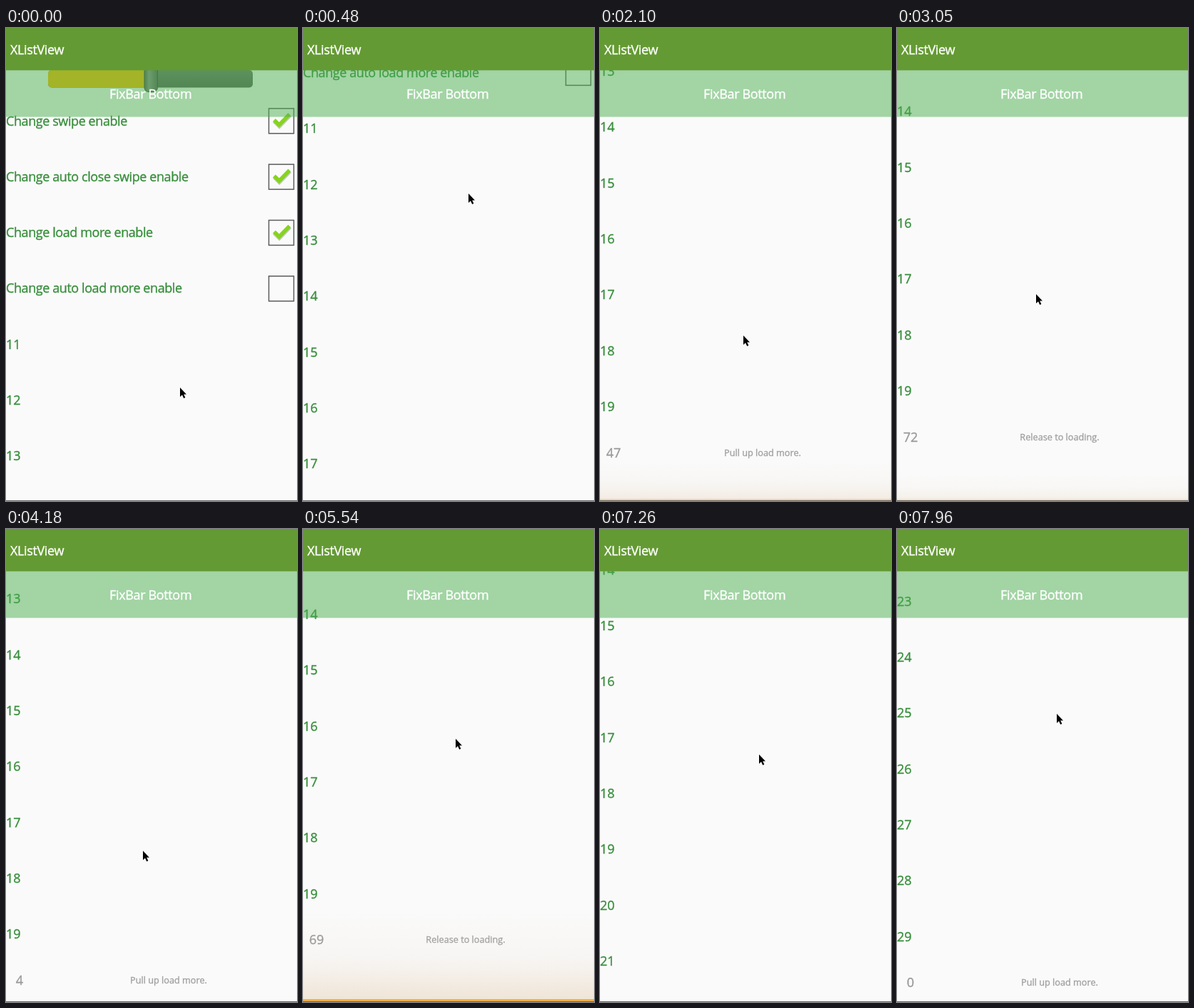
An HTML page that plays this animation: 408x663 px, repeating every 8 s.

```html
<!DOCTYPE html>
<html lang="en">
<head>
<meta charset="utf-8">
<title>XListView</title>
<style>
  html, body { margin: 0; width: 100%; height: 100%; overflow: hidden; background: #fafafa; }
  svg { display: block; width: 408px; height: 663px; }
  text { font: 18px "Open Sans", "Noto Sans", sans-serif; stroke-width: .35px; }
  .row { fill: #388e3c; stroke: #388e3c; }
  .label { letter-spacing: -.42px; }
  .bar { fill: #fff; stroke: #fff; letter-spacing: -.35px; }
  .count { fill: #999; stroke: #999; text-anchor: middle; }
  .hint { fill: #a0a0a0; stroke: #a0a0a0; font-size: 12.7px; }
</style>
</head>
<body>
<svg viewBox="0 0 408 663">
  <defs>
    <linearGradient id="haze" x1="0" y1="0" x2="0" y2="1">
      <stop offset="0" stop-color="#e6cda5" stop-opacity="0"/>
      <stop offset=".5" stop-color="#e0cdb4" stop-opacity=".1"/>
      <stop offset="1" stop-color="#dcbb91" stop-opacity=".36"/>
    </linearGradient>
    <linearGradient id="track" x1="0" y1="0" x2="0" y2="1">
      <stop offset="0" stop-color="#6e736c"/>
      <stop offset="1" stop-color="#585d56"/>
    </linearGradient>
    <linearGradient id="thumb">
      <stop offset="0" stop-color="#555"/>
      <stop offset=".35" stop-color="#8c8c8c"/>
      <stop offset="1" stop-color="#5a5a5a"/>
    </linearGradient>
  </defs>
  <rect width="408" height="663" fill="#fafafa"/>

  <g id="list">
    <rect x="59" y="59" width="287" height="24.5" rx="5" fill="url(#track)"/>
    <path d="M200 59H64a5 5 0 0 0-5 5v14.5a5 5 0 0 0 5 5h136z" fill="#fcb900"/>
    <rect x="194" y="52" width="18.5" height="37.5" rx="6" fill="url(#thumb)" stroke="#3c3c3c"/>
    <g id="footer">
      <text class="count" id="count" x="19" y="6.3"></text>
      <text class="hint" id="hint" y="4.3"></text>
      <g id="spinner" fill="none" stroke-width="2.4">
        <circle r="5.3" stroke="#ddd"/>
        <path d="M0-5.3A5.3 5.3 0 0 0 0 5.3" stroke="#666"/>
        <path d="M0 5.3A5.3 5.3 0 0 0 5.3 0" stroke="#aaa"/>
      </g>
    </g>
  </g>

  <rect id="glow" width="408" fill="url(#haze)"/>
  <rect id="edge" width="408" fill="#f2b047"/>
  <rect y="662" width="408" height="1" fill="#666"/>

  <rect y="59" width="408" height="65.6" fill="#4caf50" fill-opacity=".5"/>
  <text class="bar" x="145" y="99.3">FixBar Bottom</text>
  <rect width="408" height="59.3" fill="#649a33"/>
  <text class="bar" x="6" y="36.8">XListView</text>

  <path id="cursor" d="M0 0V13L3 10.2 5.2 15 7.4 14 5.2 9.4H9Z" stroke="#fff" paint-order="stroke"/>
</svg>
<script>
const LOOP = 8000, TICK = 59.4;
const ROW = 78.33, FIRST = 7, FIRST_Y = 130, REST = 498.7;
const FIRST_PULL = 20, RELEASE = 95, LOADED = 116;
const PULL_RATIO = .383, THRESHOLD = 45;

const linear = f => f;
const smooth = f => f * f * (3 - 2 * f);
const out = f => 1 - (1 - f) ** 2;

function ramp(tick, from, to, ease = linear) {
  return ease(Math.min(1, Math.max(0, (tick - from) / (to - from))));
}
const pulse = (tick, from, peak, hold, to) => ramp(tick, from, peak) * (1 - ramp(tick, hold, to));

const gesture = (from, to, dx, dy, ease, pulls = false) => ({ from, to, dx, dy, ease, pulls });
const gestures = [
  gesture(0, 7, -12, -279, smooth),
  gesture(7, 18, -19, 312, smooth),
  gesture(FIRST_PULL, 45, -18, -164, smooth, true),
  gesture(51, 61, -3, 55, out, true),
  gesture(67, 72, 0, 27, out, true),
  gesture(72, 74, 0, -4, linear),
  gesture(74, 93, 22, -157, linear, true),
  gesture(108, LOADED, 8, 136, smooth),
  gesture(118, 124, 2, -171, linear),
];

// Pulling up stretches the footer; pushing down gives back twice as fast.
function follow(tick) {
  const state = { x: 244, y: 504, pull: 0 };
  for (const { from, to, dx, dy, ease, pulls } of gestures) {
    const f = ramp(tick, from, to, ease);
    state.x += dx * f;
    state.y += dy * f;
    if (pulls) state.pull -= dy * f * PULL_RATIO * (dy > 0 ? 2 : 1);
  }
  state.pull *= 1 - ramp(tick, RELEASE, RELEASE + 7, out);
  return state;
}

const $ = id => document.getElementById(id);
const list = $('list'), footer = $('footer'), count = $('count'), hint = $('hint'),
  spinner = $('spinner'), glow = $('glow'), edge = $('edge'), cursor = $('cursor');

function set(el, attrs) {
  for (const name in attrs) el.setAttribute(name, attrs[name]);
}
function add(parent, tag, attrs, text = '') {
  const el = document.createElementNS('http://www.w3.org/2000/svg', tag);
  set(el, attrs);
  el.textContent = text;
  return parent.appendChild(el);
}
function move(el, x, y) { set(el, { transform: `translate(${x} ${y})` }); }
function show(el, on) { el.style.display = on ? '' : 'none'; }

function addCheckbox(row, checked) {
  add(row, 'rect', { x: 368.5, y: -17.2, width: 35, height: 35, fill: '#fafafa',
    stroke: '#5c5c5c', 'stroke-width': 1.5 });
  if (!checked) return;
  const mark = { d: 'M376-1L383 6 397.5-9', fill: 'none' };
  add(row, 'path', { ...mark, stroke: '#c4c8c0', 'stroke-width': 6.5, transform: 'translate(.3 1.2)' });
  add(row, 'path', { ...mark, stroke: '#86d41c', 'stroke-width': 5.4 });
}

const options = ['swipe', 'auto close swipe', 'load more', 'auto load more'];
const rows = Array.from({ length: 23 }, (_, i) => {
  const row = add(list, 'g', {}), option = options[i];
  move(row, 0, FIRST_Y + i * ROW);
  add(row, 'text', { class: option ? 'row label' : 'row', x: 0, y: 6.5 },
    option ? `Change ${option} enable` : i + FIRST);
  if (option) addCheckbox(row, i < 3);
  return row;
});

function drawFooter(tick, pull, last) {
  const loading = tick > RELEASE && tick < LOADED;
  move(footer, 0, FIRST_Y + (last - FIRST) * ROW + 64.8);
  count.textContent = tick < FIRST_PULL ? '' : Math.round(pull * 1.15);
  hint.textContent = loading ? 'Loading...'
    : pull > THRESHOLD ? 'Release to loading.' : 'Pull up load more.';
  set(hint, { x: loading ? 199 : 228, 'text-anchor': loading ? 'start' : 'middle' });
  show(spinner, loading);
  set(spinner, { transform: `translate(186 0) rotate(${(tick - RELEASE - 10) * 24})` });
}

function drawGlow(tick) {
  const shine = .4 * pulse(tick, 11, 13, 13, 21)
    + .7 * pulse(tick, FIRST_PULL, 43, 43, 57)
    + pulse(tick, 74, 93, RELEASE, RELEASE + 6);
  const height = 125 * shine, thick = 1 + 2 * shine;
  set(glow, { y: 662 - height, height, opacity: Math.sqrt(shine) });
  set(edge, { y: 662 - thick, height: thick, opacity: shine });
}

function draw(time) {
  const tick = Math.floor(time / TICK);
  const { x, y, pull } = follow(tick);
  const scroll = REST * ramp(tick, 0, 14, smooth) + 10 * ROW * ramp(tick, 118, 134, smooth);
  const last = tick < LOADED ? 19 : 29;
  move(list, 0, -scroll - pull);
  rows.forEach((row, i) => show(row, i + FIRST <= last));
  drawFooter(tick, pull, last);
  drawGlow(tick);
  move(cursor, Math.round(x), Math.round(y));
}

const start = performance.now();
function loop() {
  draw((performance.now() - start) % LOOP);
  requestAnimationFrame(loop);
}
loop();
</script>
</body>
</html>
```
